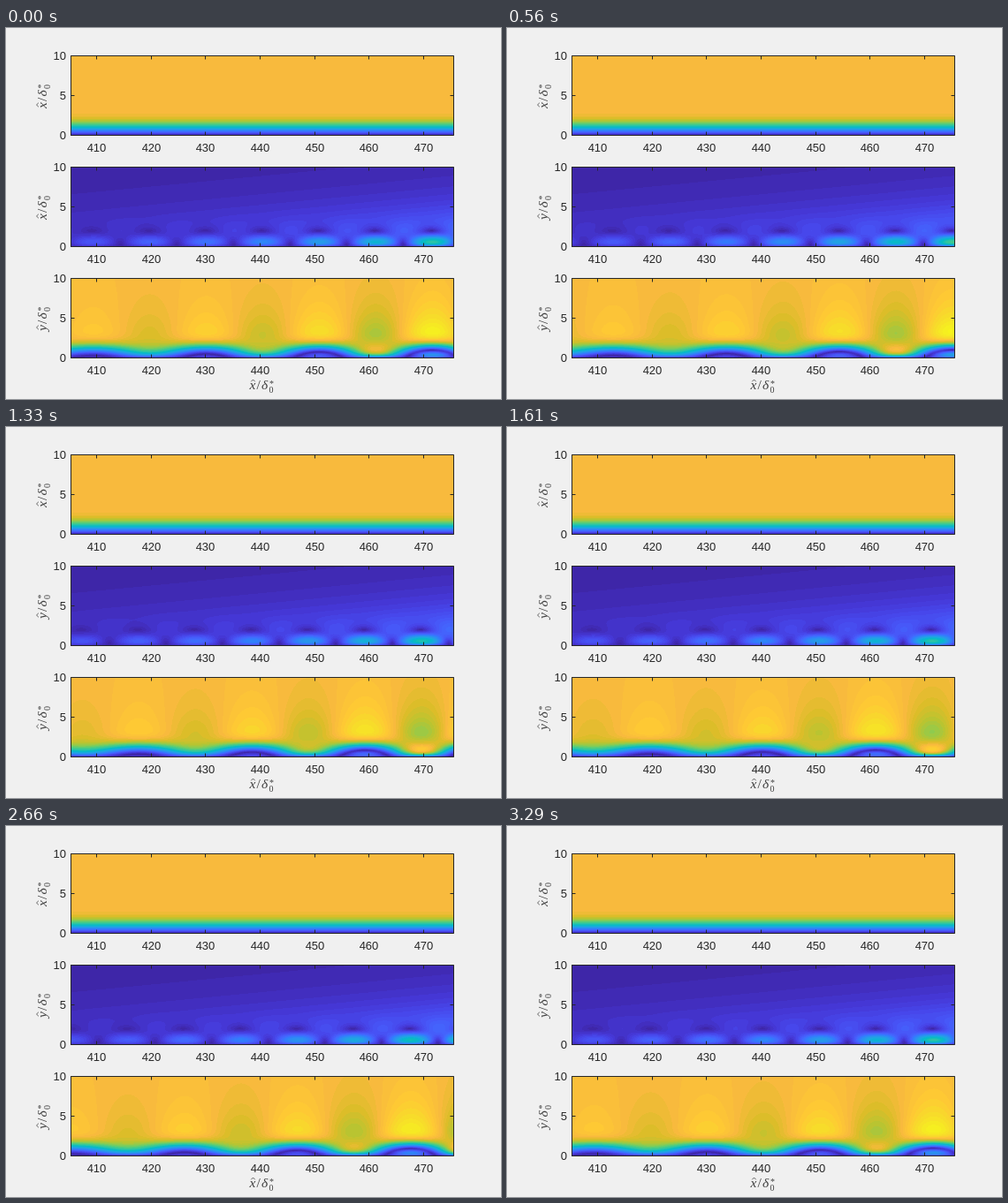
Write an HTML page with a canvas that moves like this. It is 560x420 px and loops after 3.36 s.

```html
<!DOCTYPE html>
<html lang="en">
<head>
<meta charset="utf-8">
<title>Boundary layer wave</title>
<style>
  html, body { margin: 0; width: 100%; height: 100%; overflow: hidden; background: #f0f0f0; }
  canvas, svg { position: absolute; left: 0; top: 0; width: 560px; height: 420px; }
  text { fill: #262626; font-family: "Liberation Sans", Arial, sans-serif; font-size: 13px; }
  .math text { fill: #404040; font-family: "Liberation Serif", "Times New Roman", serif; font-size: 15.5px; }
  .math .it { font-style: italic; }
  .math .small { font-size: 10px; }
  path { fill: none; stroke: #262626; stroke-width: 1; }
  .math path { stroke: #404040; stroke-width: .8; }
</style>
</head>
<body>
<canvas id="stage" width="560" height="420"></canvas>
<svg id="axes" viewBox="0 0 560 420"></svg>
<script>
const STEP = 70, COUNT = 48;
const LEFT = 73, WIDTH = 433, HEIGHT = 90, TOPS = [31, 157, 283];
const X_SCALE = 6.167, Y_SCALE = HEIGHT / 10;
const LEVELS = 64, FREE_STREAM = 0.826;
const WAVELENGTH = 20.75, CREST = 471.4, GROWTH = 0.02, AMP = 1.42;
const WALL_RATE = 0.55, WALL_POWER = 1.7;
const ALPHA = 2 * Math.PI / WAVELENGTH;

// Colour ramp, dark blue to yellow
const ramp = ("3a1e90 402ab4 4537d5 4747eb 4758f8 4269fe 327cfc 2d8cf3 259be8 1ca9df 08b5d0 0bbdbd " +
  "2cc4a7 3fca8e 64cd6f 8fcb4e b9c431 dcbd29 f8ba3d fec934 f7dc2a f6ef20 fafe11")
  .split(" ").map(h => [0, 2, 4].map(i => parseInt(h.slice(i, i + 2), 16)));

const palette = Array.from({ length: LEVELS }, (_, n) => {
  const p = (n + 2) / 3;
  const i = Math.min(Math.floor(p), ramp.length - 2);
  return ramp[i].map((c, k) => c + (ramp[i + 1][k] - c) * (p - i));
});

// Blasius profile plus the wave's u and v shapes, one entry per pixel row
function makeRows() {
  const rows = [], sub = 20, d = 1.7208 / Y_SCALE / sub;
  let f = 0, f1 = 0, f2 = 0.33206;
  for (let j = 0; j <= HEIGHT; j++) {
    const y = j / Y_SCALE;
    const e = Math.exp(-WALL_RATE * y ** WALL_POWER);
    const slope = WALL_RATE * WALL_POWER * y ** (WALL_POWER - 1) * e;
    const decay = AMP * Math.exp(-ALPHA * y);
    rows.unshift({
      base: FREE_STREAM * Math.min(f1, 1),
      u: -decay * (slope - ALPHA * (1 - e)),
      v: decay * ALPHA * (1 - e)
    });
    for (let s = 0; s < sub; s++) {
      f += f1 * d;
      f1 += f2 * d;
      f2 -= f * f2 / 2 * d;
    }
  }
  return rows;
}

const rows = makeRows();
const ctx = document.getElementById("stage").getContext("2d");
const image = ctx.createImageData(WIDTH, HEIGHT + 1);

function paint(top, value) {
  let p = 0;
  for (const row of rows) {
    for (let i = 0; i < WIDTH; i++) {
      const n = Math.floor(value(row, i) * LEVELS);
      const c = palette[Math.min(n, LEVELS - 1)];
      image.data[p++] = c[0];
      image.data[p++] = c[1];
      image.data[p++] = c[2];
      image.data[p++] = 255;
    }
  }
  ctx.putImageData(image, LEFT, top);
}

const cosine = new Float64Array(WIDTH), sine = new Float64Array(WIDTH);

function drawWave(frame) {
  const shift = WAVELENGTH * frame / (COUNT - 1);
  for (let i = 0; i < WIDTH; i++) {
    const x = 410 + (LEFT + i - 102) / X_SCALE;
    const amp = Math.exp(GROWTH * (x - CREST));
    const phase = ALPHA * (x - CREST - shift);
    cosine[i] = amp * Math.cos(phase);
    sine[i] = amp * Math.sin(phase);
  }
  const speed = (u, v) => Math.sqrt(u * u + v * v);
  paint(TOPS[1], (r, i) => speed(r.u * cosine[i], r.v * sine[i]));
  paint(TOPS[2], (r, i) => speed(r.base + r.u * cosine[i], r.v * sine[i]));
}

function mathLabel(letter, transform, id = "") {
  return `<g class="math" transform="${transform}">
    <text class="it" id="${id}" x="-15" y="0">${letter}</text>
    <path d="M-13.2 -8.7L-11 -11L-8.8 -8.7"/>
    <text x="-7" y="0">/</text><text class="it" x="-1.5" y="0">δ</text>
    <text class="small" x="7.5" y="-3">*</text><text class="small" x="7" y="4">0</text></g>`;
}

const snap = n => Math.floor(n) + 0.5;

function makeAxes() {
  let out = "";
  TOPS.forEach((top, k) => {
    const t = top + 0.5, b = t + HEIGHT, l = LEFT + 0.5, r = l + WIDTH;
    let d = `M${l} ${t}H${r}V${b}H${l}Z`;
    for (let n = 410; n <= 470; n += 10) {
      const x = snap(102.5 + (n - 410) * X_SCALE);
      d += `M${x} ${b}v-4M${x} ${t}v4`;
      out += `<text x="${x}" y="${top + 109}" text-anchor="middle">${n}</text>`;
    }
    for (const n of [0, 5, 10]) {
      const y = snap(b - n * Y_SCALE);
      d += `M${l} ${y}h4M${r} ${y}h-4`;
      out += `<text x="68" y="${y + 4.5}" text-anchor="end">${n}</text>`;
    }
    out += `<path d="${d}"/>`;
    out += mathLabel(k ? "y" : "x", `translate(45.5 ${top + 45}) rotate(-90)`, "axis" + k);
  });
  return out + mathLabel("x", "translate(290.5 409)");
}

document.getElementById("axes").innerHTML = makeAxes();
const middleLabel = document.getElementById("axis1");
paint(TOPS[0], r => r.base);

let shown = -1;
function tick() {
  const frame = Math.floor(performance.now() / STEP) % COUNT;
  if (frame !== shown) {
    shown = frame;
    drawWave(frame);
    middleLabel.textContent = frame ? "y" : "x";
  }
  requestAnimationFrame(tick);
}
tick();
</script>
</body>
</html>
```
